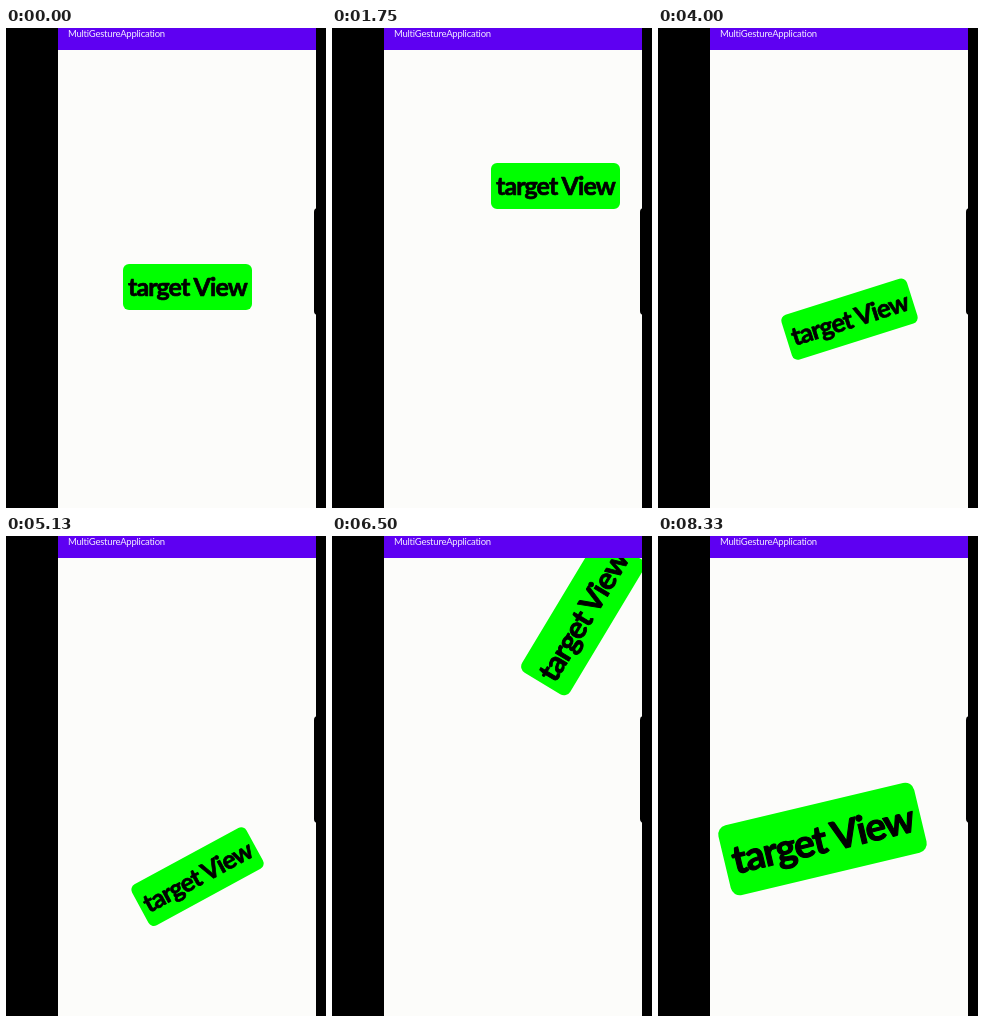
These frames come from a looping animation (320 by 480 pixels, 8.37 s). An HTML page:

```html
<!DOCTYPE html>
<html lang="en">
<head>
<meta charset="utf-8">
<title>Multi gesture view</title>
<style>
  html, body { margin: 0; height: 100%; overflow: hidden; background: #000; }
  svg { display: block; width: 100vw; height: 100vh; }
  text { font-family: Lato, "Open Sans", sans-serif; }
  #target text {
    font-size: 25px; font-weight: 700; letter-spacing: -0.9px;
    text-anchor: middle; stroke: #000; stroke-width: 0.7; stroke-linejoin: round;
  }
  #title { font-size: 9.5px; letter-spacing: -0.22px; fill: #f3edff; }
</style>
</head>
<body>
<svg viewBox="0 0 320 480">
  <defs>
    <clipPath id="content"><rect x="52" y="22" width="258" height="458"/></clipPath>
  </defs>
  <rect width="320" height="480"/>
  <rect x="52" y="22" width="258" height="458" fill="#fcfcfa"/>
  <g clip-path="url(#content)">
    <g id="target">
      <rect x="-64.5" y="-23" width="129" height="46" rx="6" fill="#0f0"/>
      <text y="9">target View</text>
    </g>
  </g>
  <rect x="52" width="258" height="22" fill="#5e00f2"/>
  <text id="title" x="62" y="8.5">MultiGestureApplication</text>
  <rect x="308" y="180" width="16" height="107" rx="4"/>
</svg>
<script>
const LOOP = 8370;
const SWING = 40; // how far a drag bows downwards on its way

// Each gesture brings the view to a new pose; angles are counter-clockwise.
const poses = [
  { time: 40, x: 181.5, y: 259, scale: 1, angle: 0 },
  { time: 1750, x: 223.5, y: 158, scale: 1, angle: 0 },
  { time: 3210, x: 160, y: 208.5, scale: 2, angle: 50 },
  { time: 4000, x: 191.5, y: 291, scale: 1.02, angle: 17.5 },
  { time: 5130, x: 191.5, y: 340.5, scale: 1.01, angle: 28.5 },
  { time: 6500, x: 251, y: 80, scale: 1.22, angle: 59 },
  { time: 8330, x: 164.5, y: 303, scale: 1.56, angle: 13.4 }
];

const target = document.getElementById("target");
const clamp = u => Math.min(1, Math.max(0, u));
const ease = u => u * u * (3 - 2 * u);

function draw(time) {
  const next = Math.max(1, poses.findIndex(pose => pose.time > time));
  const i = time >= poses.at(-1).time ? poses.length - 1 : next;
  const from = poses[i - 1], to = poses[i];
  const u = clamp((time - from.time) / (to.time - from.time));
  const mix = key => from[key] + (to[key] - from[key]) * ease(u);
  const y = mix("y") + SWING * Math.sin(Math.PI * u);
  target.setAttribute("transform",
    `translate(${mix("x")} ${y}) rotate(${-mix("angle")}) scale(${mix("scale")})`);
}

const start = performance.now();
function tick() {
  draw((performance.now() - start) % LOOP);
  requestAnimationFrame(tick);
}
tick();
</script>
</body>
</html>
```
